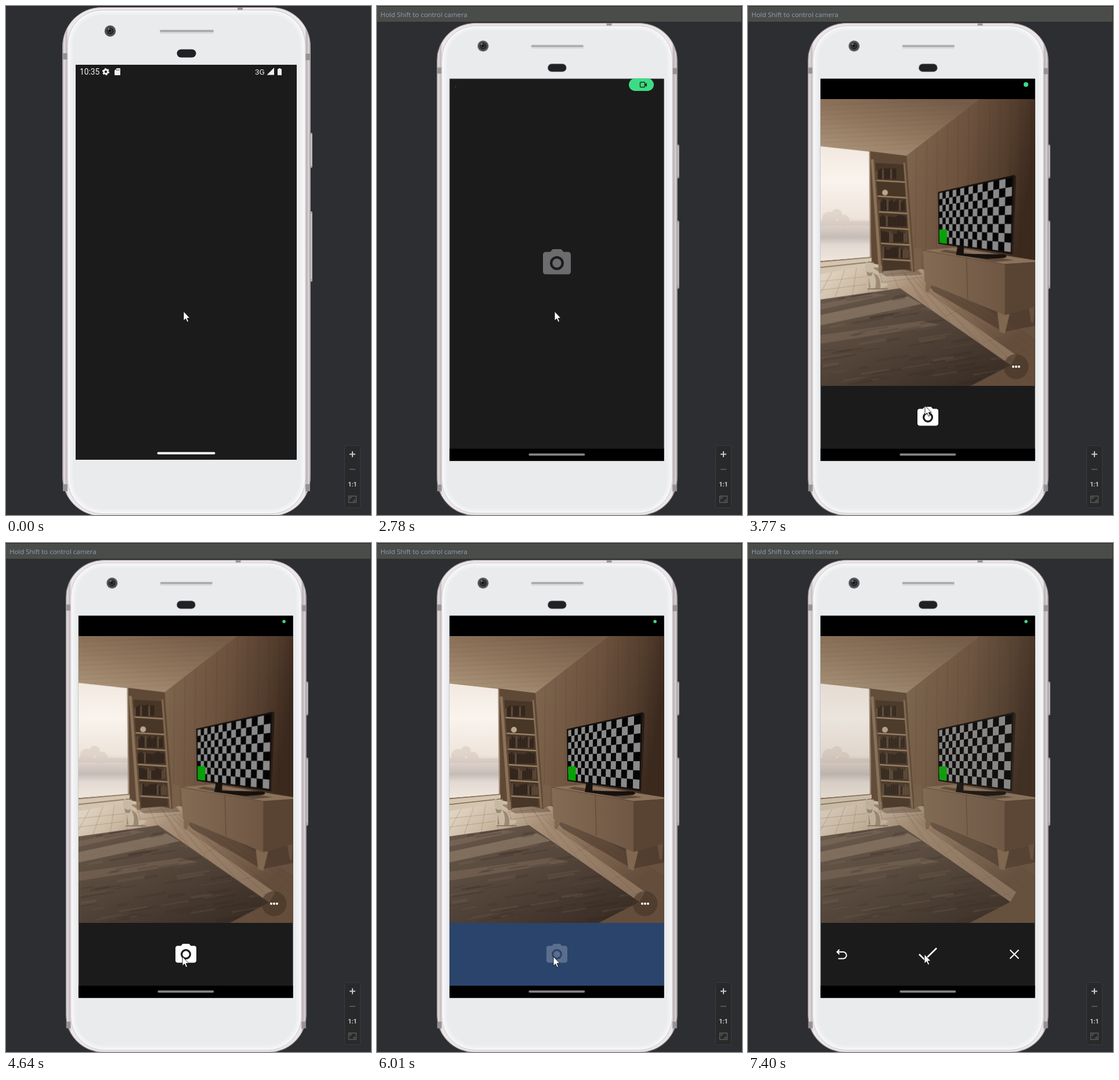
An HTML page for the animation above (8000 ms loop, 629 by 875 pixels).

```html
<!DOCTYPE html>
<html lang="en">
<head>
<meta charset="utf-8">
<title>Phone camera</title>
<style>
html, body { margin: 0; width: 100%; height: 100%; overflow: hidden; background: #2d2e32; }
svg { display: block; width: 629px; height: 875px; }
text { font-family: Roboto, sans-serif; }

.step { animation: 8s step-end infinite; }
.phone { animation-name: phone; }
.banner { animation-name: banner; }
.status { animation-name: status; }
.nav { animation-name: nav; transform-origin: 125px 0; }
.home { animation-name: home; }
.splash { animation-name: splash; }
.speck { animation-name: speck; }
.live { animation-name: live; }
.more { animation-name: more; }
.press { animation-name: press; }
.shutter { animation-name: shutter; }
.review { animation-name: review; }
.chip { animation-name: chip; }
.chip-icon { animation-name: chip-icon; }
.mouse { animation-name: mouse; }
.room { animation: sway 8s linear infinite; transform-origin: 200px 450px; }

@keyframes phone {
  0% { transform: none; }
  6.25%, 100% { transform: translate(8.6px, 27.27px) scale(.97, .9676); }
}
@keyframes banner { 0% { opacity: 0; } 6.25%, 100% { opacity: 1; } }
@keyframes status {
  0% { opacity: 1; } 12.625% { opacity: .6; } 14.125% { opacity: .3; } 17.125%, 100% { opacity: 0; }
}
@keyframes nav {
  0% { transform: scaleX(0); } 18.625% { transform: scaleX(.94); } 20.375%, 100% { transform: none; }
}
@keyframes home { 0% { fill: #f4f4f4; } 12.625% { fill: #d4d4d4; } 29.75%, 100% { fill: #8b8b8b; } }
@keyframes splash { 0% { opacity: 0; } 20.375% { opacity: 1; } 36.5%, 100% { opacity: 0; } }
@keyframes speck { 0% { opacity: 0; } 31.625% { opacity: 1; } 42.625%, 100% { opacity: 0; } }
@keyframes live { 0% { opacity: 0; } 36.5%, 100% { opacity: 1; } }
@keyframes more { 0% { opacity: 1; } 81.25%, 100% { opacity: 0; } }
@keyframes press {
  0% { opacity: 0; } 68.875% { opacity: .35; } 70.375% { opacity: .7; } 71.875% { opacity: 1; }
  76.625% { opacity: .5; } 78.125%, 100% { opacity: 0; }
}
@keyframes shutter {
  0% { opacity: 0; } 36.5% { opacity: 1; } 71.875% { opacity: .23; } 81.25%, 100% { opacity: 0; }
}
@keyframes review { 0% { opacity: 0; } 81.25%, 100% { opacity: 1; } }
@keyframes chip {
  0% { opacity: 0; x: 434px; y: 124.5px; width: 43px; height: 21.5px; }
  34.75% { opacity: 1; x: 434px; y: 124.5px; width: 43px; height: 21.5px; }
  36.5% { opacity: 1; x: 429px; y: 124.5px; width: 48px; height: 21.5px; }
  38% { opacity: 1; x: 427px; y: 124.5px; width: 50px; height: 21.5px; }
  44.125% { opacity: 1; x: 442px; y: 125px; width: 36px; height: 20px; }
  45.625% { opacity: 1; x: 462px; y: 128px; width: 18px; height: 14px; }
  47.125% { opacity: 1; x: 475px; y: 131px; width: 8px; height: 8px; }
  48.875%, 100% { opacity: 1; x: 476.3px; y: 132.2px; width: 5.6px; height: 5.6px; }
}
@keyframes chip-icon {
  0% { opacity: 0; transform: translateX(7px); }
  34.75% { opacity: 1; transform: translateX(7px); }
  36.5% { opacity: 1; transform: translateX(2px); }
  38% { opacity: 1; transform: none; }
  44.125%, 100% { opacity: 0; transform: none; }
}
@keyframes mouse {
  0% { transform: translate(306px, 525px); }
  44.125% { transform: translate(306px, 560px); }
  45.625% { transform: translate(305px, 630px); }
  47.125% { transform: translate(305px, 687px); }
  48.875% { transform: translate(304px, 712px); }
  50.375% { transform: translate(304px, 714px); }
  55% { transform: translate(304px, 711px); }
  90.625% { transform: translate(304px, 710px); }
  92.5%, 100% { transform: translate(304px, 707px); }
}
@keyframes sway {
  0%, 38% { transform: none; }
  58% { transform: scale(1.006); }
  75%, 100% { transform: none; }
}
</style>
</head>
<body>
<svg viewBox="0 0 629 875">
  <defs>
    <linearGradient id="rim"><stop stop-color="#aaa4a6"/><stop offset=".007" stop-color="#e6e0e2"/><stop offset=".015" stop-color="#c2b9bc"/><stop offset=".022" stop-color="#ece8ea"/><stop offset=".978" stop-color="#ece8ea"/><stop offset=".985" stop-color="#b6aeb1"/><stop offset=".993" stop-color="#ded8da"/><stop offset="1" stop-color="#a19b9e"/></linearGradient>
    <linearGradient id="ceiling" x1="0" y1="1" x2=".7" y2="0"><stop stop-color="#b09a80"/><stop offset=".5" stop-color="#92785f"/><stop offset="1" stop-color="#755c48"/></linearGradient>
    <linearGradient id="wall" y2=".25"><stop stop-color="#816850"/><stop offset=".5" stop-color="#6c523e"/><stop offset=".8" stop-color="#533d2d"/><stop offset="1" stop-color="#3b291e"/></linearGradient>
    <linearGradient id="sky" x2="0" y2="1"><stop stop-color="#f2e9e0"/><stop offset=".3" stop-color="#faf4ee"/><stop offset=".62" stop-color="#eee4db"/><stop offset=".72" stop-color="#d6cbc4"/><stop offset=".79" stop-color="#c6bcb7"/><stop offset=".86" stop-color="#e3dad3"/><stop offset="1" stop-color="#efe6dd"/></linearGradient>
    <linearGradient id="floor" x2=".9" y2=".6"><stop stop-color="#e9dfcf"/><stop offset=".25" stop-color="#cbb9a2"/><stop offset=".5" stop-color="#967c64"/><stop offset="1" stop-color="#644d3b"/></linearGradient>
    <linearGradient id="rug" x2=".8" y2="1"><stop stop-color="#6a5a4d"/><stop offset=".5" stop-color="#54453a"/><stop offset="1" stop-color="#382c24"/></linearGradient>
    <linearGradient id="front"><stop stop-color="#846b54"/><stop offset="1" stop-color="#6f5744"/></linearGradient>
    <clipPath id="view"><path d="M125 160H494.500V653H125Z"/></clipPath>
    <clipPath id="rugClip"><path d="M125 504 262 485 452 617 382 653H125Z"/></clipPath>
    <g id="camera">
      <path d="M9 2 7.17 4H4C2.9 4 2 4.9 2 6V18C2 19.1 2.9 20 4 20H20C21.1 20 22 19.1 22 18V6C22 4.9 21.1 4 20 4H16.83L15 2ZM12 17A5 5 0 1 1 12 7 5 5 0 0 1 12 17Z"/>
      <circle cx="12" cy="12" r="3.2"/>
    </g>
  </defs>

  <path fill="#2d2e32" d="M0 0H629V875H0Z"/>
  <path fill="#242528" d="M0 0H629V1H0Z"/>
  <g class="step banner">
    <path fill="#4a4c49" d="M0 1H628V27H0Z"/>
    <text x="6" y="19" fill="#929eb6" style="font: 11.45px 'Open Sans', sans-serif">Hold Shift to control camera</text>
  </g>

  <g class="step phone">
    <rect x="523" y="218" width="5" height="60" rx="2" fill="#aaa6a8"/>
    <rect x="523" y="353" width="5" height="121" rx="2" fill="#aaa6a8"/>
    <path d="M526 221V274M526 357V469" stroke="#e4e2e3"/>
    <rect x="97.5" y="2.5" width="427" height="874" rx="67" fill="url(#rim)" stroke="#a69fa2"/>
    <path d="M98 81H106V92H98ZM516 82H524V93H516ZM98 822H106V834H98ZM516 822H524V834H516ZM399 2H408V7H399Z" fill="#969294"/>
    <rect x="106" y="7" width="410" height="866" rx="60" fill="#f6f5f7" stroke="#cbc5c8"/>
    <rect x="113" y="13" width="396" height="854" rx="54" fill="#e9ebed" stroke="#eff0f2" stroke-width="4"/>
    <circle cx="179.5" cy="43" r="9.7" fill="#505154"/>
    <circle cx="179.5" cy="43" r="6" fill="#252629"/>
    <circle cx="179" cy="42.5" r="3" fill="#0d0e10" stroke="#5b5c60"/>
    <circle cx="177" cy="39.5" r="1.3" fill="#92969a"/>
    <rect x="265" y="40.5" width="93" height="7" rx="2" fill="#d6d7d9"/>
    <path d="M265.5 43H357.5" stroke="#a3a4a6" stroke-width="3"/>
    <rect x="294.5" y="74.500" width="33" height="14" rx="7" fill="#202125"/>
    <path fill="#1b1b1b" d="M120 101H501V780H120Z"/>
    <g class="step status" fill="#f0f0f0">
      <text x="127" y="118" font-size="13.8">10:35</text>
      <circle cx="172" cy="113" r="3.5" fill="none" stroke="#f0f0f0" stroke-width="2.8"/>
      <circle cx="172" cy="113" r="5.2" fill="none" stroke="#f0f0f0" stroke-width="2" stroke-dasharray="2.7 2.75"/>
      <path d="M191 107H196Q197 107 197 108V118Q197 119 196 119H188Q187 119 187 118V111Z"/>
      <path d="M190.5 109V111M192.7 109V111M195 109V111" stroke="#1b1b1b"/>
      <text x="429" y="117.5" font-size="13.5">3G</text>
      <path d="M449.5 118.5H462V106ZM470 107H473V108.3H475V119H468V108.3H470Z"/>
    </g>
  </g>

  <path class="step nav" d="M125 761H494.500V782H125Z"/>
  <g class="step phone">
    <rect class="step home" x="260.500" y="766.7" width="100" height="4" rx="2"/>
  </g>
  <use class="step splash" href="#camera" transform="translate(281.2 413.2) scale(2.4)" fill="#6c6c6f"/>

  <g class="step live">
    <path d="M125 125H494.500V160H125Z"/>
    <g clip-path="url(#view)">
      <g class="room">
        <path fill="#675140" d="M120 155H500V660H120Z"/>
        <path fill="url(#floor)" d="M120 452 215 440 300 452 500 575V660H120Z"/>
        <path fill="#ab927a" opacity=".55" d="M262 485 286 476 462 600 452 617Z"/>
        <g id="boards" fill="none" stroke="#5d4634" stroke-opacity=".25"/>
        <path fill="url(#ceiling)" d="M120 155H406L273 258 205 251 120 241Z"/>
        <g id="beams" fill="none" stroke="#4d3829" stroke-opacity=".1"/>
        <path fill="url(#wall)" d="M273 258 406 155H500V450L442 443 300 450 286 456Z"/>
        <g id="planks" fill="none" stroke="#2e1b0f" stroke-opacity=".13"/>
        <path fill="#5f4936" d="M209 250 273 258 287 457 212 442Z"/>
        <path fill="#483627" d="M217 270 269 273 279 452 231 456Z"/>
        <path fill="url(#sky)" d="M120 241 210 251 212 432 120 439Z"/>
        <g fill="#c9b9ad" opacity=".35">
          <circle cx="140" cy="366" r="12"/><circle cx="153" cy="358" r="9"/><circle cx="165" cy="369" r="10"/>
          <path d="M125 370H211V378H125Z"/>
        </g>
        <path d="M209.500 251 211 434" stroke="#a08b75" stroke-width="2"/>
        <path fill="#d3c5b0" d="M120 440 213 432V445L120 462Z"/>
        <path d="M120 440 213 432M120 450 213 440" stroke="#80694f" stroke-width="1.500"/>
        <path fill="#4b392b" opacity=".4" d="M213 449 292 453 300 462 238 465Z"/>
        <g id="shelf"/>
        <circle cx="236" cy="321" r="5" fill="#baa78e"/>
        <path d="M214 264 228 459" stroke="#8b7259" stroke-width="5"/>
        <path d="M218 266 232 458" stroke="#634c38" stroke-width="2"/>
        <path d="M269 270 283 456" stroke="#846b53" stroke-width="3"/>
        <path d="M286 415 299 417V452L286 455Z" fill="#78604a"/>

        <path fill="url(#rug)" d="M120 505 262 485 452 617 382 653 365 662H120Z"/>
        <g clip-path="url(#rugClip)">
          <path fill="#97836f" opacity=".6" d="M120 532 276 499 299 512 120 550Z"/>
          <path fill="#8b7765" opacity=".4" d="M120 513 214 494 240 496 120 523ZM120 566 300 541 330 548 120 581Z"/>
          <g id="weave"/>
        </g>

        <path fill="#c8b9a3" d="M205 485C202 472 206 462 204 456 201 451 202 445 204 439L208 443H212L216 440C218 448 217 453 215 457 224 461 229 468 229 475L240 477C243 482 232 484 228 485Z"/>
        <path fill="#8c7964" opacity=".75" d="M216 459C226 463 229 471 228 485H219C222 475 220 466 216 459ZM208 466 211 484H208ZM204 456Q210 461 215 457L213 464H206Z"/>
        <path d="M206 486H241" stroke="#715b46" stroke-opacity=".6" stroke-width="2"/>

        <path fill="#3f2d21" opacity=".5" d="M306 475 442 531 500 515V548L440 560 320 491Z"/>
        <path fill="#80674f" d="M306 473 317 478 310 493 306 491ZM429 526 450 530 442 563 433 560Z"/>
        <path fill="#67503d" d="M483 518 493 515 491 545 487 543Z"/>
        <path fill="#8b725b" d="M301 420 356 415 500 438V441L442 445Z"/>
        <path fill="url(#front)" d="M301 420 442 444V531L304 474Z"/>
        <path fill="#594333" d="M442 444 500 440V515L442 531Z"/>
        <path d="M376 433 378 503M301 420 442 444 500 440" fill="none" stroke="#453224" stroke-opacity=".6"/>
        <path fill="#2b1e16" opacity=".45" d="M340 419 458 437 425 440 330 422Z"/>
        <path fill="#17110e" d="M361 411 372 413 371 426 441 427Q449 430 441 433L411 435 358 428Z"/>
        <path fill="#17110e" d="M327 320 458 291 461 293 456 427 328 409Z"/>
        <path d="M459 292 455 426" stroke="#3c2b22" stroke-width="1.3"/>
        <path fill="#050505" d="M329.5 322 454.5 295 452 423 329.5 407Z"/>
        <path id="checks" fill="#8a8a8a"/>
        <path fill="#07a207" d="M329.5 384H342.5V409L329.5 407Z"/>
      </g>
      <path class="step review" fill="#746d59" fill-opacity=".11" d="M125 160H495V653H125Z"/>
    </g>
    <g class="step more">
      <circle cx="462" cy="620" r="21.5" fill="#453427" fill-opacity=".6"/>
      <path d="M457 620H457.01M462 620H462.01M467 620H467.01" stroke="#fff" stroke-width="4" stroke-linecap="round"/>
    </g>
  </g>

  <path class="step press" fill="#2b446c" d="M125 653H494.500V761H125Z"/>
  <use class="step shutter" href="#camera" transform="translate(288.4 685.4) scale(1.8)" fill="#fff"/>
  <g class="step review" fill="none" stroke="#fff" stroke-width="2">
    <path d="M154 703H164A5.7 5.7 0 0 1 164 714.4H155.5M157.5 699 153.5 703 157.5 707"/>
    <path d="M295 707 304.5 716.5 325 696.5" stroke-width="2.6"/>
    <path d="M451.5 699.5 466.5 714.5M466.5 699.5 451.5 714.5"/>
  </g>

  <circle class="step speck" cx="135.5" cy="139" r="1" fill="#454545"/>
  <rect class="step chip" rx="10.75" fill="#3ddc84"/>
  <g class="step chip-icon">
    <rect x="446.5" y="131" width="8" height="8.5" rx="1" fill="none" stroke="#16351f" stroke-width="1.5"/>
    <path d="M455 134.5 458 132V139L455 136.5Z" fill="#16351f"/>
  </g>

  <rect x="583.5" y="755.5" width="27" height="107" rx="3" fill="#28292a" stroke="#3a3b3b"/>
  <path d="M592 770.5H602M597 765.5V775.5" stroke="#c9c9c9" stroke-width="2"/>
  <path d="M592 796.5H602" stroke="#646464" stroke-width="1.5"/>
  <text x="597" y="826" text-anchor="middle" font-size="11" font-weight="700" fill="#c9c9c9">1:1</text>
  <path d="M590.5 842.5H603.5V853.5H590.5ZM593 848V845H596M601 848V851H598" fill="none" stroke="#5e5e5e" stroke-width="1.3"/>

  <path class="step mouse" d="M0 0V16L3.7 12.6 6.2 18.3 8.6 17.2 6.2 11.7H11Z" fill="#fff" stroke="#111" stroke-width=".9"/>
</svg>
<script>
let seed = 7;
const rand = () => (seed = seed * 16807 % 2147483647) / 2147483647;
const get = id => document.getElementById(id);
const mix = (a, b, p) => a + (b - a) * p;
const path = (parent, d, attrs = {}) => {
  const el = document.createElementNS('http://www.w3.org/2000/svg', 'path');
  el.setAttribute('d', d);
  for (const key in attrs) el.setAttribute(key, attrs[key]);
  get(parent).append(el);
};

// Television test pattern in perspective
const cols = 16, rows = 8;
const corner = (c, r) => {
  const u = c / cols, p = u / (1.5 * (1 - u) + u);
  const y = mix(mix(322, 295, p), mix(407, 423, p), r / rows);
  return `${mix(329.5, mix(454.5, 452, r / rows), p).toFixed(1)} ${y.toFixed(1)}`;
};
let checks = '';
for (let c = 0; c < cols; c++)
  for (let r = c % 2; r < rows; r += 2)
    checks += `M${corner(c, r)}L${corner(c + 1, r)}L${corner(c + 1, r + 1)}L${corner(c, r + 1)}Z`;
get('checks').setAttribute('d', checks);

// Wood lines on wall, ceiling and floor
for (let x = 290; x < 495; x += 18) {
  const top = Math.max(160, 258 - (x - 273) * .775);
  path('planks', `M${x} ${top}L${x - 2} 445`);
}
for (let i = 0; i < 11; i++) path('beams', `M120 ${172 + i * 8}L${395 - i * 11} ${160 + i * 8.5}`);
for (let i = 0; i < 8; i++) {
  path('boards', `M${130 + i * 19} 450l${i * 12 - 45} 60`);
  path('boards', `M${270 + i * 9} ${460 + i * 2}L${410 + i * 30} 653`);
}
path('boards', 'M120 474 290 456M120 489 310 465M405 578 440 568M440 606 478 589M340 533 372 518');

// Bookcase rows
for (let i = 0; i < 6; i++) {
  const y = 301 + i * 27, left = 219 + i * 2.2, right = 271 + i * 2;
  if (i !== 1)
    for (let x = left + 3; x < (i ? right - 4 : 254); x += 3.5)
      path('shelf', `M${x} ${y - 3}v${-14 - rand() * 6}`, { stroke: rand() < .7 ? '#30241c' : '#5b4839', 'stroke-width': 3 });
  path('shelf', `M${left} ${y - 1}L${right} ${y + 2}`, { stroke: '#9a8167', 'stroke-width': 2.5 });
}

// Rug streaks
for (let i = 0; i < 90; i++) {
  const x = 115 + rand() * 320, y = 495 + rand() * 160, w = 12 + rand() * 45;
  path('weave', `M${x} ${y}l${w} ${-w * .16}`, {
    stroke: rand() < .45 ? '#8b7765' : '#30261f', 'stroke-width': 1 + rand() * 4, opacity: .18
  });
}
</script>
</body>
</html>
```
